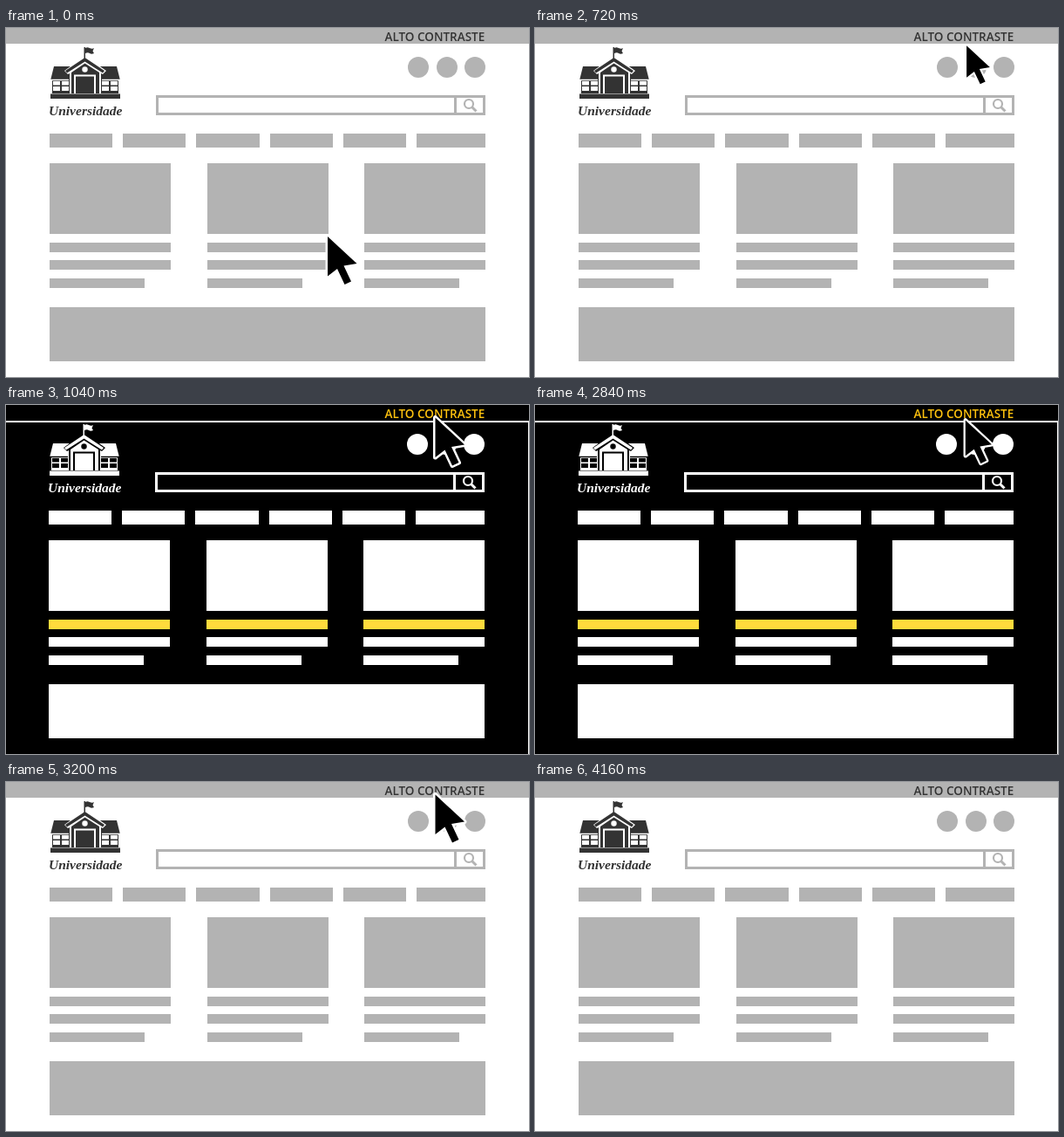
These frames come from a looping animation (600 by 400 pixels, 4.24 s). An HTML page:

```html
<!DOCTYPE html>
<html lang="pt">
<head>
<meta charset="utf-8">
<title>Alto contraste</title>
<style>
  html, body { margin: 0; width: 100%; height: 100%; overflow: hidden; }
  svg {
    display: block; width: 600px; height: 400px;
    --bg: #fff; --block: #b3b3b3; --accent: #b3b3b3;
    --bar: #b3b3b3; --edge: none; --ink: #333; --label: #333;
  }
  svg.dark {
    --bg: #000; --block: #fff; --accent: #ffdb3c;
    --bar: #000; --edge: #fff; --ink: #fff; --label: #ffc20e;
  }
  .dark #page { transform: translateX(-1px); }
  .bg { fill: var(--bg); }
  .bar { fill: var(--bar); }
  .edge { fill: var(--edge); }
  .block { fill: var(--block); }
  .accent { fill: var(--accent); }
  .line { fill: none; stroke: var(--block); }
  .ink { fill: var(--ink); }
  .gap { fill: none; stroke: var(--bg); }
  .label { fill: var(--label); font: 600 13.5px "Open Sans", sans-serif; }
  .name { font: italic 700 15.5px "Liberation Serif", serif; }
  #cursor {
    fill: #000; stroke: #fff; stroke-width: 5;
    stroke-linejoin: round; paint-order: stroke;
  }
</style>
</head>
<body>
<svg id="stage" viewBox="0 0 600 400">
  <rect class="bg" width="600" height="400"/>
  <rect class="bar" width="600" height="18"/>
  <path class="edge" d="M0 18H600V400H599V20H0Z"/>
  <text class="label" x="434.5" y="15">ALTO CONTRASTE</text>

  <g id="page">
    <g id="school">
      <path class="ink" d="M55 44H127L131 60H129V75H53V60H51Z"/>
      <path class="gap" stroke-width="1.5" d="M51 59.5H72M110 59.5H131"/>
      <path class="bg" d="M54 61H62V72H54ZM64 61H72V72H64ZM110 61H118V72H110ZM120 61H128V72H120Z"/>
      <path class="ink" d="M53 65.500H73V67H53ZM109 65.500H129V67H109Z"/>
      <path class="bg" d="M90.500 32L115 49L111 53L109 52V75H73V52L71 53L67 49Z"/>
      <path class="ink" d="M90.500 34L113 49L111 51.500L90.500 38.500L70 51.500L68 49Z"/>
      <path class="ink" d="M90.500 40.500L107 51V75H75V51Z"/>
      <circle class="bg" cx="90.500" cy="47.500" r="3.200"/>
      <path class="gap" stroke-width="2" d="M79 75V54.500H102V75"/>
      <rect class="ink" x="51" y="75.500" width="80" height="5.500"/>
      <path class="ink" d="M89.500 22H91V35H89.500ZM91 23Q93 21.500 96 23T101 23L99.500 26.500L101 29Q98 30.500 96 29T91 29Z"/>
      <text class="ink name" x="49" y="99.500">Universidade</text>
    </g>

    <g class="block">
      <circle cx="473" cy="45" r="12"/>
      <circle cx="506" cy="45" r="12"/>
      <circle cx="538" cy="45" r="12"/>
    </g>
    <path class="line" stroke-width="3" d="M173.500 78.500H548.500V98.500H173.500ZM515.500 78V99"/>
    <circle class="line" cx="531" cy="87" r="5" stroke-width="2.200"/>
    <path class="line" stroke-width="3" d="M534.500 90.500L539.500 95.500"/>
    <g id="blocks"></g>
  </g>

  <path id="cursor" d="M0 0V45.500L11 37L19.500 55L27 51.500L18.500 33.500L33.500 31Z"/>
</svg>
<script>
const LOOP = 4240, STEP = 40;
const START = { x: 369, y: 239 }, BUTTON = { x: 492.5, y: 14.5 };
const PIVOT = { x: 13, y: 29 };
const stage = document.getElementById('stage');
const blocks = document.getElementById('blocks');
const cursor = document.getElementById('cursor');

function addRect(x, y, width, height, kind = 'block') {
  const rect = document.createElementNS(stage.namespaceURI, 'rect');
  rect.setAttribute('class', kind);
  Object.entries({ x, y, width, height }).forEach(([k, v]) => rect.setAttribute(k, v));
  blocks.append(rect);
}

[[50, 122], [134, 206], [218, 291], [303, 375], [387, 459], [471, 550]]
  .forEach(([left, right]) => addRect(left, 121, right - left, 16));
for (const x of [50, 231, 411]) {
  addRect(x, 155, 139, 81);
  addRect(x, 246, 139, 11, 'accent');
  addRect(x, 266, 139, 11);
  addRect(x, 287, 109, 11);
}
addRect(50, 320, 500, 62);

// Number of completed steps in a run whose first change happens at `begin`.
const stepsSince = (t, begin, count) =>
  Math.max(0, Math.min(count, Math.floor((t - begin) / STEP) + 1));

// A press shrinks the pointer to half size in five steps, then restores it.
const pressScale = n => 0.5 + Math.abs(n - 5) / 10;

const mix = (a, b, p) => a + (b - a) * p;

function draw(t) {
  const enter = stepsSince(t, 40, 14) / 14;
  const leave = stepsSince(t, 3920, 7);
  const scale = pressScale(stepsSince(t, t < 2840 ? 680 : 2840, 10));
  const x = mix(START.x, BUTTON.x, enter) + 17.5 * leave + PIVOT.x * (1 - scale);
  const y = mix(START.y, BUTTON.y, enter) + PIVOT.y * (1 - scale);
  cursor.setAttribute('transform', `translate(${x} ${y}) scale(${scale})`);
  stage.classList.toggle('dark', t >= 760 && t < 2920);
}

const start = performance.now();
function tick(now) {
  draw(Math.max(0, now - start) % LOOP);
  requestAnimationFrame(tick);
}
draw(0);
requestAnimationFrame(tick);
</script>
</body>
</html>
```
